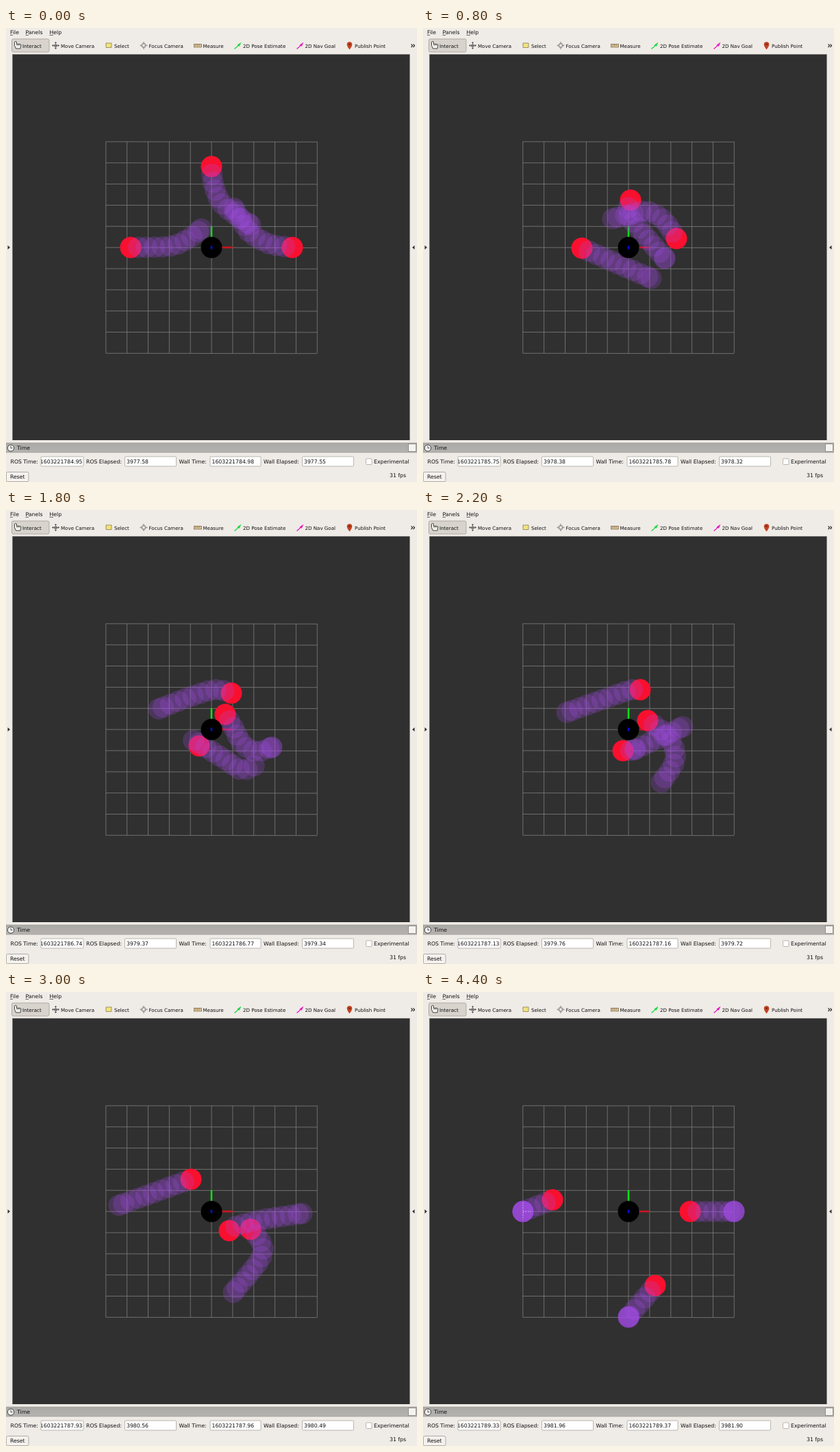
Recreate the animation shown at these times as an HTML page. Size 600 by 662 pixels, loop 4.5 s.

```html
<!DOCTYPE html>
<html lang="en">
<head>
<meta charset="utf-8">
<title>Robot view</title>
<style>
  html, body { margin: 0; width: 100%; height: 100%; overflow: hidden; background: #efebe7; }
  svg { display: block; }
  text { font: 7.75px "DejaVu Sans", sans-serif; fill: #111; }
  .tools text { font-size: 7.1px; }
  .field rect { fill: #fff; stroke: #aaa69e; stroke-width: .8; }
</style>
</head>
<body>
<svg id="stage" width="600" height="662" viewBox="0 0 600 662">
  <defs>
    <linearGradient id="bar" x2="0" y2="1">
      <stop offset="0" stop-color="#aaa9a6"/><stop offset="1" stop-color="#b5b3b0"/>
    </linearGradient>
    <clipPath id="rosClip"><rect x="51.5" y="625" width="61.5" height="14"/></clipPath>
  </defs>
  <rect width="600" height="662" fill="#efebe7"/>

  <g id="menu">
    <text x="6" y="9">File</text><text x="28.5" y="9">Panels</text><text x="63.5" y="9">Help</text>
    <path d="M6 10.5h4M28.5 10.5h4.5M63.5 10.5h5.5" stroke="#111" stroke-width=".6"/>
  </g>

  <g class="tools">
    <rect x="8.5" y="16" width="54.5" height="19" rx="2" fill="#d8d4cd" stroke="#aaa59c" stroke-width=".9"/>
    <path d="M12.5 20.5v5l2 4.5h6.5l1-5.5-1.5-1h-5v-3.300q-1.500-1.500-3 .3z" fill="#f5f3ee" stroke="#333" stroke-width=".9"/>
    <path d="M16 23.500v2.500M18 23.500v2.500M20 23.700v2.300" stroke="#333" stroke-width=".6"/>
    <text x="24" y="28.500">Interact</text>

    <path d="M72.500 20.500v10M67.500 25.500h10M71 22l1.500-1.500 1.500 1.500M71 29l1.500 1.500 1.500-1.500M69 24l-1.500 1.500 1.500 1.500M76 24l1.500 1.500-1.500 1.500" fill="none" stroke="#555" stroke-width=".9"/>
    <rect x="70" y="24" width="5" height="3.500" fill="#777"/>
    <text x="80" y="28.500">Move Camera</text>

    <rect x="146" y="22" width="8" height="6.500" fill="#f3e37c" stroke="#55502f" stroke-width=".8" stroke-dasharray="1.500 .7"/>
    <text x="158" y="28.500">Select</text>

    <g fill="none" stroke="#969696" stroke-width="1.300">
      <circle cx="201" cy="25.500" r="2.800"/><path d="M201 20v4M201 27v4M195.500 25.500h4M202.500 25.500h4"/>
    </g>
    <text x="208.500" y="28.500">Focus Camera</text>

    <rect x="274.500" y="23.500" width="11" height="4.500" fill="#d4bd94" stroke="#7b6544" stroke-width=".7"/>
    <path d="M277 24v2M279.500 24v2M282 24v2" stroke="#7b6544" stroke-width=".6"/>
    <text x="287.500" y="28.500">Measure</text>

    <path d="M333.500 30l5-4-.7-1 5-3.500-2.300 5-.8-.8-5.500 4.800z" fill="#13d83b" stroke="#13d83b" stroke-width=".7"/>
    <text x="346" y="28.500">2D Pose Estimate</text>
    <path d="M424.500 30l5-4-.7-1 5-3.500-2.300 5-.8-.8-5.500 4.800z" fill="#e516bd" stroke="#e516bd" stroke-width=".7"/>
    <text x="436.500" y="28.500">2D Nav Goal</text>

    <path d="M501.500 31.500q-3.800-5-3.800-7.500a3.800 3.800 0 0 1 7.600 0q0 2.500-3.800 7.500z" fill="#c24322"/>
    <circle cx="501.500" cy="23.800" r="1.300" fill="#6d2413"/>
    <text x="509" y="28.500">Publish Point</text>
    <path d="M591.500 23.500l2 2.300-2 2.300M594.500 23.500l2 2.300-2 2.300" fill="none" stroke="#111" stroke-width="1.100"/>
  </g>

  <rect x="9.500" y="38.500" width="580" height="562.500" fill="#303030"/>
  <path d="M9.500 601V38.500H589.500" fill="none" stroke="#77746f" stroke-width=".7"/>
  <path d="M2.500 317l3.500 3-3.500 3zM596.500 317l-3.500 3 3.500 3z" fill="#333"/>
  <path id="grid" fill="none" stroke="#838383" stroke-width=".75"/>
  <path d="M300 320V289" stroke="#0be011" stroke-width="2.600"/>
  <path d="M300 320H331" stroke="#c81420" stroke-width="2.600"/>
  <g id="heads" fill="#f9102f"></g>
  <g id="trails" fill="#a54beb" fill-opacity=".235"></g>
  <path id="goalMark" d="M146 307v25M146 320h14" stroke="#ddd" stroke-width=".8" stroke-dasharray="1.500 2"/>
  <circle cx="300" cy="320" r="15.500" fill="#000"/>
  <rect x="298.700" y="317.500" width="2.600" height="5" fill="#0b0bd0"/>

  <rect y="605" width="600" height="14" fill="url(#bar)"/>
  <path d="M0 605h600M0 619h600" stroke="#99968f" stroke-width=".6"/>
  <circle cx="7" cy="612.500" r="4.700" fill="#eee" stroke="#333" stroke-width=".9"/>
  <path d="M7 609.500v3h2.500" fill="none" stroke="#333" stroke-width=".8"/>
  <text x="16" y="615.300">Time</text>
  <rect x="587.500" y="606.500" width="11" height="11" fill="#f5f3f0" stroke="#85827c" stroke-width=".8"/>

  <g class="field">
    <rect x="51" y="625" width="62" height="14" rx="1"/><rect x="173.500" y="625" width="75" height="14" rx="1"/>
    <rect x="298" y="625" width="74" height="14" rx="1"/><rect x="432.500" y="625" width="75" height="14" rx="1"/>
    <rect x="525.500" y="628" width="8.500" height="8.500" rx="1"/>
  </g>
  <text x="6.500" y="635.300">ROS Time:</text>
  <text x="117" y="635.300">ROS Elapsed:</text>
  <text x="252.500" y="635.300">Wall Time:</text>
  <text x="376" y="635.300">Wall Elapsed:</text>
  <text x="537" y="635.300">Experimental</text>
  <g clip-path="url(#rosClip)"><text id="rosTime" x="111.500" y="635.300" text-anchor="end"></text></g>
  <text id="rosElapsed" x="176" y="635.300"></text>
  <text id="wallTime" x="300.500" y="635.300"></text>
  <text id="wallElapsed" x="435" y="635.300"></text>
  <text x="560" y="654.500">31 fps</text>
  <rect x=".5" y="647.500" width="32.500" height="14" rx="2" fill="#f4f1ee" stroke="#aaa59c" stroke-width=".9"/>
  <text x="6" y="657.300">Reset</text>
</svg>
<script>
const LOOP = 4500, STEP = 100, RADIUS = 15.5;
const COUNT = 10, SPACING = 11.6;
const $ = id => document.getElementById(id);

// Planned path of each robot at each key time; the first point is the robot itself.
const KEYS = [0, 800, 1800, 2200, 3000, 3600, 4400];
const PLANS = [
  ['300,202 303,228 317,258 357,287', '303,251 300,272 320,298 353,336',
   '320,298 331,315 345,341 365,352 388,346', '328,307 352,325 366,345 367,368 348,397',
   '357,346 372,364 372,388 332,438', '371,390 300,474', '339,428 300,474'],
  ['182,320 240,318 268,306 285,293', '232,321 262,334 298,350 333,365',
   '282,344 273,335 285,342 320,364 345,379 368,370', '292,351 312,350 304,349 314,347 345,332 379,316',
   '326,348 340,340 380,331 432,323', '353,325 385,321 454,320', '390,320 454,320'],
  ['418,320 385,315 358,300 345,284 333,263', '370,307 350,279 326,267 300,272 277,278',
   '329,267 305,262 270,272 223,290', '317,262 298,264 210,295',
   '270,273 165,311', '235,286 146,320', '189,303 146,320']
];

// Elapsed hundredths of a second at the key times.
const ROS = [0, 80, 179, 218, 298, 358, 438];
const WALL = [0, 80, 179, 218, 298, 359, 439];
const WALL_ELAPSED = [0, 77, 179, 217, 294, 358, 435];

const mix = (a, b, u) => a + (b - a) * u;

function hermite(a, b, da, db, u) {
  const u2 = u * u, u3 = u2 * u;
  return (2 * u3 - 3 * u2 + 1) * a + (u3 - 2 * u2 + u) * da + (3 * u2 - 2 * u3) * b + (u3 - u2) * db;
}

function smoothCurve(points) {
  const out = [points[0]], at = i => points[Math.max(0, Math.min(points.length - 1, i))];
  for (let i = 0; i < points.length - 1; i++)
    for (let s = 1; s <= 16; s++)
      out.push([0, 1].map(c => hermite(at(i)[c], at(i + 1)[c],
        (at(i + 1)[c] - at(i - 1)[c]) / 2, (at(i + 2)[c] - at(i)[c]) / 2, s / 16)));
  return out;
}

// Equally spaced points along a plan; those past its end pile up there.
function samplePlan(plan) {
  const curve = smoothCurve(plan.split(' ').map(p => p.split(',').map(Number)));
  const out = [curve[0]];
  let walked = 0;
  for (let i = 1; i < curve.length; i++) {
    const [a, b] = [curve[i - 1], curve[i]], len = Math.hypot(b[0] - a[0], b[1] - a[1]);
    while (out.length <= COUNT && out.length * SPACING <= walked + len) {
      const u = (out.length * SPACING - walked) / len;
      out.push([mix(a[0], b[0], u), mix(a[1], b[1], u)]);
    }
    walked += len;
  }
  while (out.length <= COUNT) out.push(curve[curve.length - 1]);
  return out;
}

function segment(t) {
  let i = 0;
  while (i < KEYS.length - 2 && t >= KEYS[i + 1]) i++;
  return [i, (t - KEYS[i]) / (KEYS[i + 1] - KEYS[i])];
}

function smoothAt(t, value) {
  const [i, u] = segment(t), last = KEYS.length - 1;
  const slope = k => {
    const a = Math.max(0, k - 1), b = Math.min(last, k + 1);
    return (value(b) - value(a)) / (KEYS[b] - KEYS[a]);
  };
  const span = KEYS[i + 1] - KEYS[i];
  return hermite(value(i), value(i + 1), slope(i) * span, slope(i + 1) * span, u);
}

function counter(values, t) {
  const [i, u] = segment(t);
  return Math.round(mix(values[i], values[i + 1], u)) / 100;
}

function addCircle(parent) {
  const c = document.createElementNS('http://www.w3.org/2000/svg', 'circle');
  c.setAttribute('r', RADIUS);
  return parent.appendChild(c);
}

const robots = PLANS.map(plans => ({
  samples: plans.map(samplePlan),
  circles: Array.from({ length: COUNT + 1 }, (_, k) => addCircle($(k ? 'trails' : 'heads')))
}));

let gridPath = '';
for (let i = 0; i <= 10; i++) {
  const p = 30.85 * i;
  gridPath += `M${145.8 + p} 165.800V474M145.600 ${165.8 + p}L454.200 ${166.2 + p}`;
}
$('grid').setAttribute('d', gridPath);

function draw(t) {
  for (const { samples, circles } of robots)
    circles.forEach((circle, k) => ['cx', 'cy'].forEach((name, c) =>
      circle.setAttribute(name, smoothAt(t, i => samples[i][k][c]).toFixed(2))));
  const ros = counter(ROS, t);
  $('rosTime').textContent = (1603221784.95 + ros).toFixed(2);
  $('rosElapsed').textContent = (3977.58 + ros).toFixed(2);
  $('wallTime').textContent = (1603221784.98 + counter(WALL, t)).toFixed(2);
  $('wallElapsed').textContent = (3977.55 + counter(WALL_ELAPSED, t)).toFixed(2);
  $('goalMark').setAttribute('visibility', t >= 4400 ? 'visible' : 'hidden');
}

const start = performance.now();
function tick() {
  const t = (performance.now() - start) % LOOP;
  draw(Math.floor(t / STEP) * STEP);
  requestAnimationFrame(tick);
}
tick();
</script>
</body>
</html>
```
